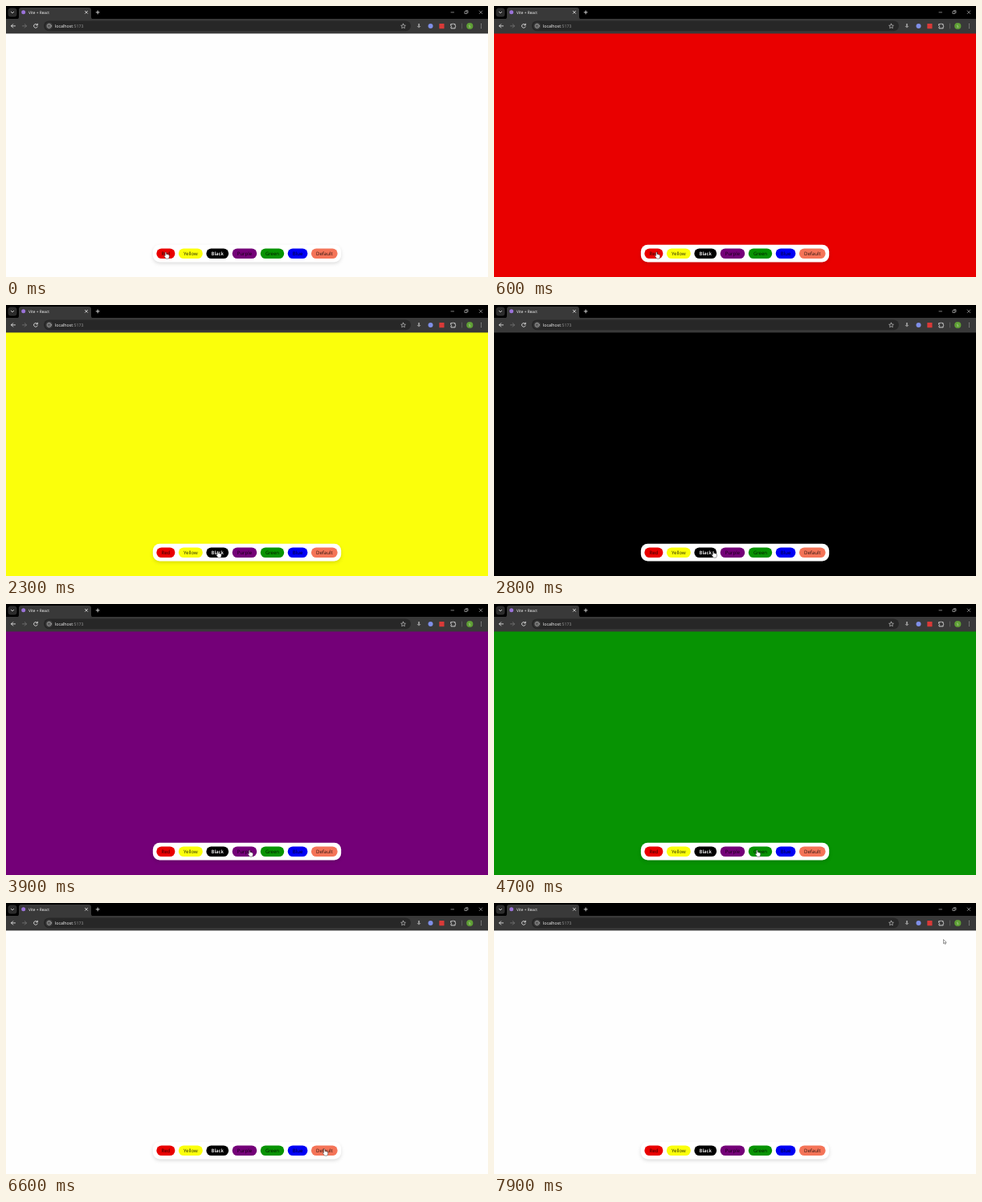
These frames come from a looping animation (600x338 px, 8 s). An HTML page:

```html
<!DOCTYPE html>
<html lang="en">
<head>
<meta charset="utf-8">
<title>Background changer</title>
<style>
  html, body { margin: 0; width: 100%; height: 100%; overflow: hidden; }
  svg { display: block; width: 100%; height: 100%; font-family: "Open Sans", "Noto Sans", sans-serif; text-rendering: geometricPrecision; }
  .line { fill: none; stroke: #e8e8e8; stroke-width: .85; stroke-linecap: round; stroke-linejoin: round; }
  .thin { stroke-width: .55; }
  .dim { stroke: #747474; }
  #panel { filter: drop-shadow(0 2.2px 2px rgba(0, 0, 0, .13)); }
  #pills { font-size: 6px; text-anchor: middle; }
</style>
</head>
<body>
<svg viewBox="0 0 600 338" preserveAspectRatio="none">
  <rect id="page" width="600" height="338"/>

  <!-- tab strip -->
  <rect width="600" height="17"/>
  <rect x="2.5" y="2.5" width="11" height="11" rx="3.5" fill="#2c2c2c"/>
  <path class="line" d="M6.4 7.3l1.600 1.600 1.600-1.600"/>
  <path fill="#393939" d="M13 16.500q3 0 3-3V5q0-3 3-3h84q3 0 3 3v8.500q0 3 3 3z"/>
  <circle cx="21.700" cy="7.800" r="2.500" fill="#9a72d8"/>
  <text x="28" y="9.700" font-size="4.800" fill="#fff">Vite + React</text>
  <path class="line" d="M98.500 6.300l3 3m0-3l-3 3M112.200 7.900h4m-2-2v4"/>
  <path class="line thin" d="M554 7.900h3.500M589.200 6l3.600 3.600m0-3.600l-3.600 3.600M571.300 6.800h2.700v2.700h-2.700zM572.300 5.700h2.700v2.700"/>

  <!-- toolbar -->
  <rect y="16" width="600" height="18.400" fill="#393939"/>
  <rect x="47" y="18.500" width="457" height="12.700" rx="6.350" fill="#272727"/>
  <path class="line" d="M11.500 24.900h-5m2.200-2.200l-2.200 2.200 2.200 2.200"/>
  <path class="line dim" d="M20.500 24.900h5m-2.200-2.200l2.200 2.200-2.200 2.200"/>
  <path class="line" d="M39 23.500a2.400 2.400 0 1 0 .2 2.400M39.300 22.200v1.700h-1.700"/>
  <circle cx="53.700" cy="24.900" r="4.500" fill="#3c3c3c"/>
  <circle class="line thin" cx="53.700" cy="24.900" r="2.500"/>
  <path class="line thin" d="M53.700 24.800v1.200m0-2.400v.1"/>
  <text x="61" y="26.800" font-size="5.250" fill="#fff">localhost<tspan fill="#999">:5173</tspan></text>
  <path class="line thin" d="M494.500 22.200l.9 1.900 2 .2-1.500 1.400.4 2-1.800-1-1.800 1 .4-2-1.500-1.400 2-.2z"/>
  <path d="M513 22h2v3h1.500l-2.500 2.500-2.500-2.500h1.500z" fill="#929292"/>
  <circle cx="528.500" cy="25" r="3" fill="#7f8fe8"/>
  <rect x="539.300" y="22" width="6.200" height="6.200" rx=".5" fill="#d83a38"/>
  <path class="line" d="M554 22.700h1.700q.8-1.800 1.700 0h1.700v1.700q1.700.8 0 1.700v1.800H554v-1.800q1.500-.8 0-1.700z"/>
  <path class="line thin dim" d="M567.500 22v6"/>
  <circle cx="577.300" cy="25" r="4.100" fill="#5f9f35"/>
  <text x="577.300" y="26.700" font-size="4.500" text-anchor="middle" fill="#dcebd2">S</text>
  <path class="line" d="M591.500 22.700v.1m0 2.100v.1m0 2.100v.1"/>

  <rect id="panel" y="297.700" height="21.900" rx="8.500" fill="#fff"/>
  <g id="pills"></g>

  <g id="pointer" stroke="#222" stroke-width=".45" stroke-linejoin="round" fill="#fff">
    <path id="hand" d="M-.7 4.500V.4Q0-.5.7.4v2.200q.8-.4 1.300.3.800-.4 1.300.4.900-.2 1.100.6v2.300l-.8 1.900H.2L-2 5q-.2-1 1.300-.5z"/>
    <path id="arrow" d="M0 0v5.200l1.200-1.100.8 1.800.9-.4-.8-1.700h1.600z"/>
  </g>
</svg>
<script>
const $ = id => document.getElementById(id);
const LOOP = 8000, STEP = 100, WHITE = "#fefefe";
const CENTER = 300, PADDING = 6.15, GAP = 4.5, TOP = 302.4, HEIGHT = 12.6, TIP_Y = 307;

// aim: how far across the pill the pointer clicks
const pills = [
  { label: "Red", fill: "#e90000", click: 200, aim: .5 },
  { label: "Yellow", fill: "#fbff0b", click: 1100, aim: .57 },
  { label: "Black", fill: "#000", click: 2800, aim: .85, ink: "#fff" },
  { label: "Purple", fill: "#740078", click: 3900, aim: .7 },
  { label: "Green", fill: "#079303", click: 4700, aim: .36 },
  { label: "Blue", fill: "#0000f4", click: 5600, aim: .52 },
  { label: "Default", fill: "#f47458", click: 6500, aim: .5, page: WHITE }
];

function add(parent, tag, attributes) {
  const node = document.createElementNS("http://www.w3.org/2000/svg", tag);
  for (const key in attributes) node.setAttribute(key, attributes[key]);
  return parent.appendChild(node);
}

// Each pill is as wide as its label plus padding; the row is centred.
function layOut() {
  for (const pill of pills) {
    pill.box = add($("pills"), "rect", { y: TOP, height: HEIGHT, rx: HEIGHT / 2, fill: pill.fill });
    pill.text = add($("pills"), "text", { y: 310.9, fill: pill.ink || "rgba(0,0,0,.85)", "font-weight": pill.ink ? 600 : 400 });
    pill.text.textContent = pill.label;
    pill.width = pill.text.getComputedTextLength() + 2 * PADDING;
  }
  const rowWidth = pills.reduce((sum, pill) => sum + pill.width + GAP, -GAP);
  let x = CENTER - rowWidth / 2;
  $("panel").setAttribute("x", x - GAP);
  $("panel").setAttribute("width", rowWidth + 2 * GAP);
  for (const pill of pills) {
    pill.x = x;
    pill.box.setAttribute("x", x);
    pill.box.setAttribute("width", pill.width);
    pill.text.setAttribute("x", x + pill.width / 2);
    x += pill.width + GAP;
  }
}
layOut();

// The pointer rests around each click, then leaves towards the top right.
const stops = [
  ...pills.map(({ x, width, click, aim }) => ({ arrive: click - 100, leave: click + 300, x: x + width * aim, y: TIP_Y })),
  { arrive: 7600, leave: LOOP, x: 559.5, y: 45.5 }
];

function tipAt(t) {
  const i = stops.findIndex(stop => t < stop.leave), to = stops[i];
  if (i === 0 || t >= to.arrive) return to;
  const from = stops[i - 1];
  const u = (t - from.leave) / (to.arrive - from.leave), k = u * u * (3 - 2 * u);
  return { x: from.x + (to.x - from.x) * k, y: from.y + (to.y - from.y) * k };
}

function draw(now) {
  const t = Math.floor(now % LOOP / STEP) * STEP;
  const clicked = pills.findLast(pill => pill.click <= t);
  const { x, y } = tipAt(t);
  const overPill = y > TOP && y < TOP + HEIGHT && pills.some(pill => x >= pill.x && x <= pill.x + pill.width);
  $("page").setAttribute("fill", clicked ? clicked.page || clicked.fill : WHITE);
  $("pointer").setAttribute("transform", `translate(${x} ${y})`);
  $("hand").style.display = overPill ? "" : "none";
  $("arrow").style.display = overPill ? "none" : "";
}

const begin = performance.now();
function tick() {
  draw(performance.now() - begin);
  requestAnimationFrame(tick);
}
tick();
</script>
</body>
</html>
```
